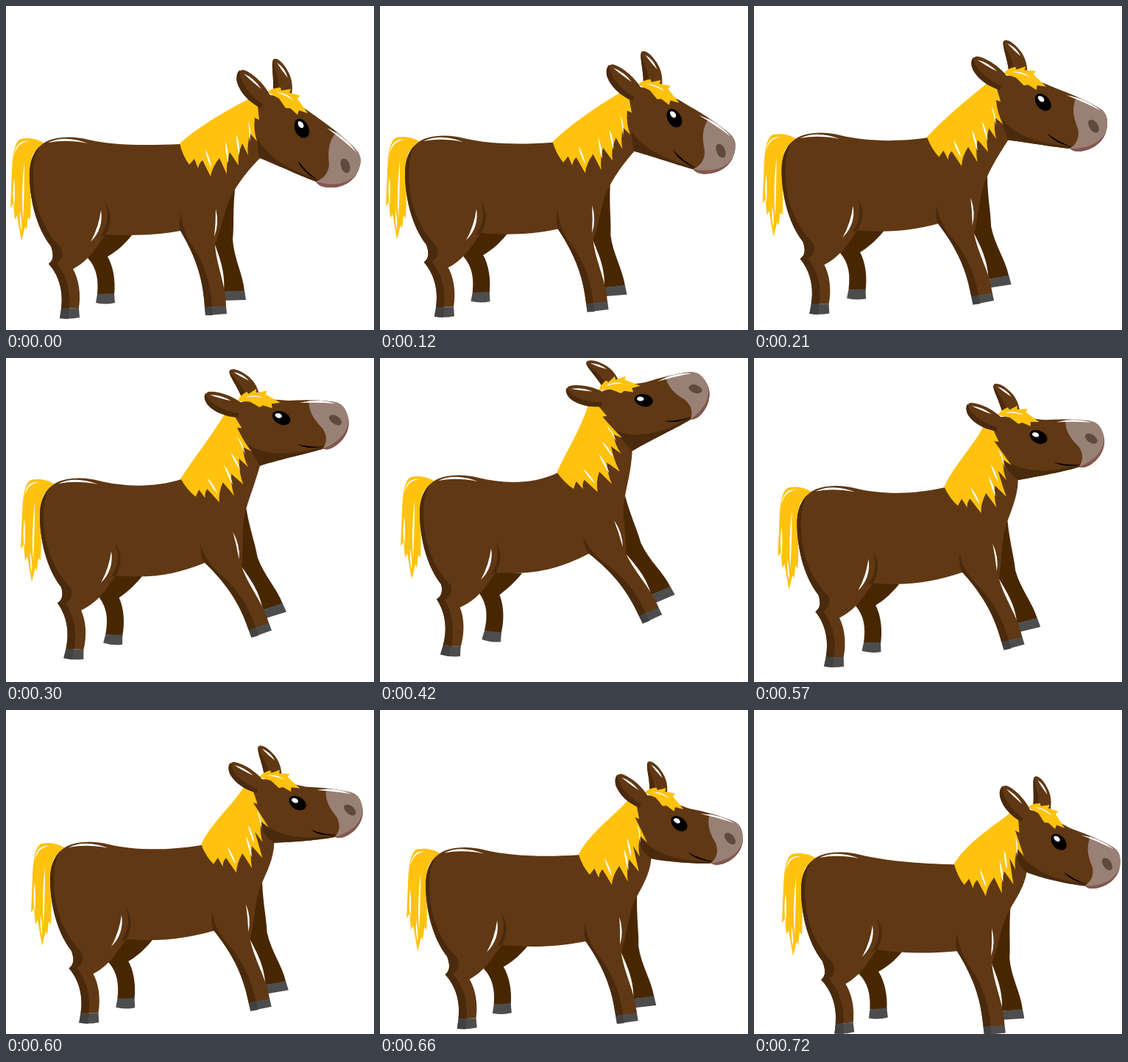
An HTML page with a canvas for the animation above (0.75 s loop, 500 by 441 pixels).

```html
<!DOCTYPE html>
<html lang="en">
<head>
<meta charset="utf-8">
<title>Rearing horse</title>
<style>
  html, body { margin: 0; width: 100%; height: 100%; overflow: hidden; background: #fff; }
  canvas { display: block; }
</style>
</head>
<body>
<canvas id="stage" width="500" height="441"></canvas>
<script>
const ctx = document.getElementById('stage').getContext('2d');
const LOOP = 750;
// Moments at which the picture changes, in ms
const STEPS = [0, 30, 120, 210, 270, 300, 360, 390, 420, 510, 540, 570, 600, 630, 660, 690, 720];

// step, rump x y, hind leg angle, front x y angle, eye x y, skull angle, muzzle angle, head scale
const KEYS = [
  [0,   0,   0,   0,    0,   0,     0, 402, 166,     0,     0,   1],
  [2,   2,  -2,  .6,    5,  -5,    -3, 400, 152,    -4,  -5.5, .99],
  [5,  14, -15,   5,   33, -40, -15.5, 374,  81, -25.5, -38.5, .94],
  [7,  20, -20, 7.5,   43, -58,   -21, 358,  55,   -35,   -54, .92],
  [8,  22, -19, 7.5,   46, -57,   -21, 358,  57, -34.5,   -53, .92],
  [9,  23, -17,   6,   46, -50,   -20, 363,  65,   -32,   -51, .92],
  [12, 28,   1,   1,   46, -12,    -8, 396, 126, -12.5,   -33, .92],
  [16, 32,  15, -2.5,  39,  21,  -1.5, 414, 179,     2,   -16, .93]
];

const BROWN = '#603813', SHADE = '#4a2a0d', FAR = '#482700', GOLD = '#ffc20e';
const HOOF = '#4d4d4d', HOOF_DARK = '#424242', WHITE = '#fff', BLACK = '#000';

// Path points carry the letter of the bone that moves them:
// r rump, h hind leg, i far hind leg, f front, s skull, m muzzle; b = r+f, n = f+s, c = s+m
const SHAPES = [
  // tail
  [GOLD, 'M r54,188 C r42,180 r30,179 r20,181 C r11,185 r9,205 r8,225 L r6,275 L r10,269 L r12,291 L r15,285 L r21,320 L r26,300 L r28,305 L r30,287 L r33,291 C r35,262 r32,238 r34,214 C r35,200 r40,193 r54,194 Z'],
  [WHITE, 'M r11,204 Q r13,182 r32,184 Q r15,185 r11,204 Z'],
  [WHITE, 'M r11,234 Q r8,255 r11,274 Q r13,255 r11,234 Z'],
  [WHITE, 'M r25,212 Q r20,255 r23,292 Q r25,255 r25,212 Z'],
  [WHITE, 'M r19,278 Q r18,295 r21,307 Q r22,292 r19,278 Z'],
  // far legs
  [FAR, 'M r115,308 L r171,312 C r158,328 r147,336 i138,341 C i146,355 i149,375 i147,393 L i124,392 C i126,372 i123,356 i111,343 Z'],
  [HOOF, 'M i124,392 L i147,391 L i148,404 Q i135,407 i122,404 Z'],
  [FAR, 'M f285,270 L f311,250 C f308,280 f310,300 f308,318 C f310,345 f322,365 f324,388 L f296,389 C f298,362 f291,345 f283,322 Z'],
  [HOOF, 'M f296,389 L f324,387 L f326,400 L f295,401 Z'],
  // far ear
  [BROWN, 'M s363,115 C s364,95 s360,80 s363,73 C s367,69 s376,76 s382,87 C s389,98 s390,110 s388,121 Z'],
  [SHADE, 'M s363,115 C s364,95 s360,80 s363,73 C s364,85 s372,100 s370,115 Z'],
  [WHITE, 'M s368,77 Q s379,84 s383,98 Q s374,87 s368,77 Z'],
  // body with near legs
  [BROWN, 'M r47,190 C r60,177 r90,176 r112,182 C r145,190 b190,190 f236,188 L n290,150 L s330,127 L s365,150 L n345,207 C f331,221 f318,238 f311,250 C f299,266 f294,300 f284,324 C f285,350 f299,380 f299,409 L f270,410 C f268,375 f260,345 f237,306 C b205,312 b170,313 r135,311 C r122,330 r112,347 h91,358 C h99,372 h102,392 h99,411 L h75,412 C h78,390 h73,368 h58,351 C h66,345 h64,336 r61,327 C r40,300 r32,260 r32,230 C r32,210 r38,198 r47,190 Z'],
  [SHADE, 'M r47,190 C r38,198 r32,210 r32,230 C r32,260 r40,300 r61,327 C h64,336 h66,345 h58,351 C h73,368 h78,390 h75,412 L h86,412 C h88,390 h84,370 h69,350 C h78,345 h78,335 r74,328 C r54,308 r37,275 r37,230 C r37,210 r41,198 r47,190 Z'],
  [SHADE, 'M r134,268 C r141,280 r139,300 r128,314 L r135,311 C r144,298 r144,279 r134,268 Z'],
  [SHADE, 'M f238,281 C f235,292 f235,300 f237,306 C f260,345 f268,375 f270,410 L f280,410 C f278,372 f266,345 f252,325 C f243,310 f239,298 f238,281 Z'],
  [HOOF, 'M h75,412 L h99,411 L h100,424 Q h86,427 h73,425 Z'],
  [HOOF_DARK, 'M h75,412 L h86,412 L h85,426 L h73,425 Z'],
  [HOOF, 'M f270,410 L f299,408 L f300,419 L f271,421 Z'],
  [HOOF_DARK, 'M f270,410 L f280,409 L f281,421 L f271,421 Z'],
  [WHITE, 'M r57,186 Q r80,175 r111,187 Q r82,181 r57,186 Z'],
  [WHITE, 'M r129,278 Q r133,303 r115,321 Q r126,301 r129,278 Z'],
  [WHITE, 'M f285,276 Q f290,296 f283,314 Q f285,296 f285,276 Z'],
  // head
  [BROWN, 'M s345,120 C s375,120 c400,134 m425,153 C m445,167 m465,184 m476,196 C m484,205 m482,214 m480,220 C m474,240 m455,248 m440,247 C m430,247 m424,243 m421,239 C m402,232 c372,218 n345,207 C s336,190 s335,150 s345,120 Z'],
  [SHADE, 'M s342,180 C s341,192 s343,202 n345,207 C c372,218 m402,232 m421,239 L m424,236 C m400,228 c358,212 s342,180 Z'],
  ['#998075', 'M m449,171 C m436,187 m438,203 m439,215 C m438,229 m431,235 m421,239 C m424,244 m430,247 m440,247 C m455,248 m474,240 m480,220 C m482,214 m484,205 m476,196 Z'],
  ['#84574f', 'M m421,239 C m424,244 m430,247 m440,247 C m455,248 m470,240 m477,228 C m464,243 m446,246 m421,239 Z'],
  ['#5e4940', 'M m457,208 C m464,206 m469,216 m467,224 C m465,230 m458,227 m456,221 C m454,215 m454,210 m457,208 Z'],
  [WHITE, 'M m436,166 Q m462,178 m476,199 Q m459,183 m436,166 Z'],
  [BLACK, 'M m396,210 Q m403,227 m424,237 Q m409,227 m396,210 Z'],
  [BLACK, 'M m396,154 C m404,151 m413,163 m412,172 C m411,181 m403,181 m398,177 C m390,170 m390,157 m396,154 Z'],
  [WHITE, 'M m398,157 C m402,156 m406,162 m404,165 C m402,168 m397,164 m397,161 C m396,159 m397,157 m398,157 Z'],
  // mane and forelock
  [GOLD, 'M f236,187 C n262,164 n296,144 s329,127 L s342,136 L s344,155 L s338,152 Q n336,170 n341,184 L n332,174 Q n327,188 n329,203 L n321,187 Q f314,203 f316,217 L f304,199 Q f299,214 f300,229 L f290,207 Q f280,219 f278,232 L f267,210 Q f262,214 f261,221 L f256,208 L f249,216 Q f240,204 f236,187 Z'],
  [WHITE, 'M f271,195 Q f273,210 f279,220 Q f277,206 f271,195 Z'],
  [WHITE, 'M f298,184 Q f298,200 f302,214 Q f303,198 f298,184 Z'],
  [WHITE, 'M n313,175 Q n313,190 n317,203 Q n318,188 n313,175 Z'],
  [WHITE, 'M n329,157 Q n334,169 n331,185 Q n331,170 n329,157 Z'],
  [GOLD, 'M s355,117 Q s363,111 s373,111 L s374,115 L s387,113 L s385,118 L s400,122 L s396,126 L s410,146 L s398,142 L s396,148 L s386,139 L s380,139 L s371,126 Z'],
  [WHITE, 'M s366,117 Q s382,118 s391,129 Q s380,121 s366,117 Z'],
  // near ear
  [BROWN, 'M s346,139 C s329,130 s318,117 s314,104 C s312,93 s317,86 s323,87 C s337,92 s352,108 s359,122 Z'],
  [SHADE, 'M s346,139 C s329,130 s318,117 s314,104 C s312,96 s314,90 s318,87 C s316,104 s333,123 s349,134 Z'],
  [WHITE, 'M s323,92 Q s337,98 s347,113 Q s333,102 s323,92 Z']
];

const mix = (p, q) => (x, y) => {
  const a = p(x, y), b = q(x, y);
  return [(a[0] + b[0]) / 2, (a[1] + b[1]) / 2];
};

// Turn and scale about (px, py), then carry that pivot to (tx, ty)
function bone(px, py, tx, ty, degrees, scale = 1) {
  const angle = degrees * Math.PI / 180;
  const c = scale * Math.cos(angle), s = scale * Math.sin(angle);
  return (x, y) => [tx + (x - px) * c - (y - py) * s, ty + (x - px) * s + (y - py) * c];
}

function slope(k, j) {
  const a = KEYS[Math.max(k - 1, 0)], b = KEYS[Math.min(k + 1, KEYS.length - 1)];
  return (b[j] - a[j]) / (b[0] - a[0]);
}

// Smooth curve through the key poses
function poseAt(step) {
  let k = 0;
  while (k < KEYS.length - 2 && KEYS[k + 1][0] <= step) k++;
  const a = KEYS[k], b = KEYS[k + 1], span = b[0] - a[0], u = (step - a[0]) / span;
  return a.slice(1).map((v, n) => {
    const j = n + 1, ease = u * u * (3 - 2 * u);
    return v + (b[j] - v) * ease
      + span * u * (1 - u) * ((1 - u) * slope(k, j) - u * slope(k + 1, j));
  });
}

function skeleton([rx, ry, hind, fx, fy, front, ex, ey, skull, muzzle, scale]) {
  const r = bone(0, 0, rx, ry, 0);
  const f = bone(284, 312, 284 + fx, 312 + fy, front);
  const s = bone(402, 166, ex, ey, skull, scale);
  const m = bone(402, 166, ex, ey, muzzle, scale);
  return {
    r, f, s, m,
    h: bone(85, 325, 85 + rx, 325 + ry, hind),
    i: bone(135, 360, 135 + rx, 360 + ry, hind),
    b: mix(r, f), n: mix(f, s), c: mix(s, m)
  };
}

function draw(step) {
  const bones = skeleton(poseAt(step));
  ctx.fillStyle = WHITE;
  ctx.fillRect(0, 0, 500, 441);
  for (const [color, path] of SHAPES) {
    ctx.fillStyle = color;
    ctx.fill(new Path2D(path.replace(/([a-z])(\d+),(\d+)/g,
      (_, name, x, y) => bones[name](+x, +y).map(v => v.toFixed(2)).join(','))));
  }
}

function tick() {
  const t = performance.now() % LOOP;
  draw(STEPS.filter(s => s <= t).length - 1);
  requestAnimationFrame(tick);
}
tick();
</script>
</body>
</html>
```
